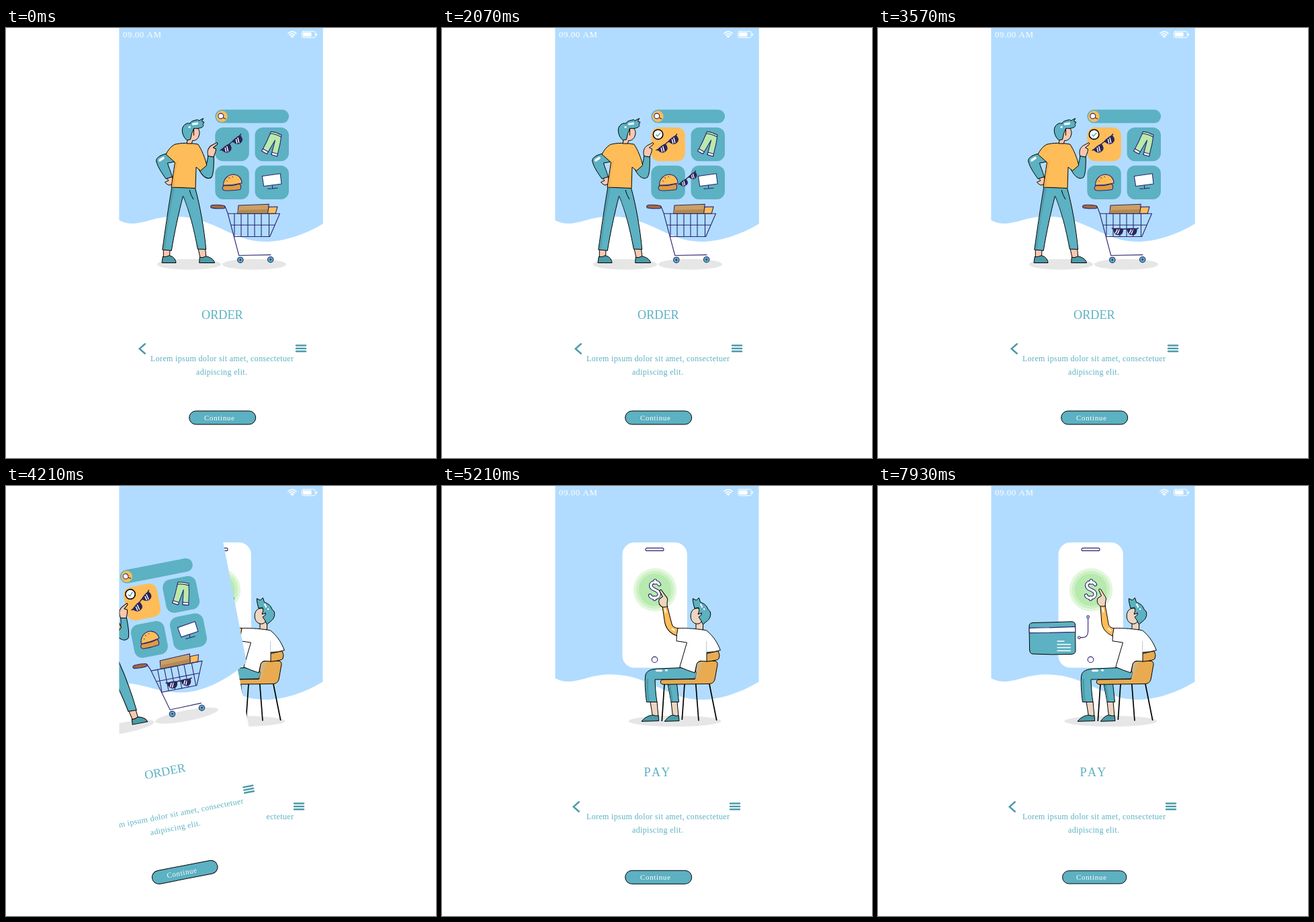
An HTML page that plays this animation: 640x640 px, repeating every 8 s.

```html
<!DOCTYPE html>
<html lang="en">
<head>
<meta charset="utf-8">
<title>Order and pay</title>
<style>
  html, body { margin: 0; width: 100%; height: 100%; overflow: hidden; background: #fff; }
  svg { display: block; width: 100%; height: 100%; }
  text { font-family: "Liberation Serif", "Times New Roman", serif; font-kerning: none; }
  .teal { fill: #5cb1c2; }
  .deep { fill: #4c9ba9; }
  .orange { fill: #ffbd59; }
  .white { fill: #fff; }
  .ink { stroke: #000; stroke-width: 1; stroke-linejoin: round; }
  .navy { stroke: #2b2670; stroke-width: 1.1; stroke-linejoin: round; stroke-linecap: round; }
  .line { fill: none; }
  .shadow { fill: #e6e6e6; }
  .pink { fill: #fbc7b0; }
  .tan { fill: #ecd5c1; }
  .chair { fill: #e8ab52; }
  .copy { font-size: 12px; letter-spacing: .35px; }
</style>
</head>
<body>
<svg viewBox="0 0 640 640">
  <defs>
    <clipPath id="screen"><rect x="168.5" width="303" height="640"/></clipPath>
    <path id="wave" fill="#b1dcff" d="M168 0H472V291C445 308 412 318 386 318C335 318 310 280.5 250 280.5C222 280.5 207 291 188 291C180 291 174 289 168 286Z"/>
    <g id="status">
      <text class="white" x="174" y="14" font-size="13" letter-spacing=".5">09.00 AM</text>
      <g fill="none" stroke="#fff" stroke-width="1.5" stroke-linecap="round">
        <path d="M419.8 8Q426 2.4 432.2 8M422 10.2Q426 6.7 430 10.2M424 12.2Q426 10.6 428 12.2"/>
        <circle cx="426" cy="13.2" r=".5"/>
        <rect x="440.4" y="5" width="20" height="9.4" rx="2.5" stroke-width="1"/>
        <path d="M462.2 8.5V11"/>
      </g>
      <rect class="white" x="442" y="6.6" width="12.5" height="6.2" rx="1"/>
    </g>
    <g id="nav" fill="none" stroke="#4c9ba9" stroke-width="2.5" stroke-linecap="round">
      <path d="M206.8 470.3L198.8 477.4L206.8 484.5M432 472.6H446M432 476.9H446M432 481.2H446"/>
    </g>
    <g id="copy" class="teal copy">
      <text x="215" y="496">Lorem ipsum dolor sit amet, consectetuer</text>
      <text x="283" y="516.3">adipiscing elit.</text>
    </g>
    <rect id="pill" class="teal ink" x="-49.5" y="-10" width="99" height="20" rx="10"/>
    <text id="label" class="white" x="295" y="583.7" font-size="11" letter-spacing=".65">Continue</text>
    <rect id="tile" width="50.5" height="50.3" rx="12"/>
    <g id="lens">
      <path fill="#2b2558" d="M-8.5 -4.6Q0 -6.2 7.5 -4.4Q8 4.8 1.5 5.4Q-6 5.6 -7.2 -2Z"/>
      <path d="M-4 2.6L-1.2 -3.4M-1.2 3.8L2.2 -3.6" stroke="#fff" stroke-width="1.5"/>
    </g>
    <g id="glasses">
      <path class="line" stroke="#2b2558" stroke-width="1.5" d="M-20 -5L-16 -4M20 -5L16 -4M-4 -3Q0 -5 4 -3"/>
      <use href="#lens" x="-10.3"/>
      <use href="#lens" x="10.3"/>
    </g>
  </defs>

  <g clip-path="url(#screen)">
    <g id="pay">
      <use href="#wave"/>
      <use href="#status"/>
      <ellipse class="shadow" cx="346.5" cy="350" rx="69" ry="8"/>
      <rect class="white" x="268.5" y="84" width="96.3" height="186.5" rx="18"/>
      <rect class="navy line" x="303" y="92.4" width="27" height="4" rx="2" stroke-width="1.3"/>
      <circle class="navy line" cx="316.5" cy="258.4" r="4.3" stroke-width="1.3"/>
      <circle cx="317" cy="154.5" r="32.3" fill="#e3f7dc"/>
      <circle cx="317" cy="154.5" r="28.2" fill="#cdf0c4"/>
      <circle cx="317" cy="154.5" r="24" fill="#b7eaae"/>
      <g id="dollar" fill="none" stroke-linecap="round">
        <path id="sign" d="M323.3 146.5C320.5 141.5 311 142 310.8 148C310.6 155.5 323.4 153.5 323.3 161C323 168 311.5 168 309.7 163M317.2 141V144M316.4 166V168.5"/>
        <use href="#sign" stroke="#2b2670" stroke-width="5.6"/>
        <use href="#sign" stroke="#fff" stroke-width="3.4"/>
      </g>

      <g id="wire" class="navy line" stroke-width="1.3">
        <circle cx="312.6" cy="194.9" r="1.8"/>
        <path id="wirePath" pathLength="100" stroke-linecap="butt" d="M312.6 197V216Q312.6 225.6 304 225.6H301.2"/>
      </g>
      <circle id="wireEnd" class="navy white" r="1.8"/>
      <g id="card">
        <path class="teal ink" d="M230 203.5Q260 203 288 201.8Q293.5 202 293.6 207L294 245Q294 250 288 250.4Q258 251.5 231 250Q226 250 225.6 244L225 209Q225 204 230 203.5Z"/>
        <path class="white navy" d="M225.1 211.4Q260 211 293.7 209.4L293.8 217.4Q260 218.5 225.2 218.6Z"/>
        <path stroke="#fff" stroke-width="1.4" d="M266.5 231H277.5M266.5 235.7H287M266.5 240.5H287M266.5 245.2H287"/>
      </g>

      <g id="payArm">
        <path class="orange ink" d="M352 212Q344 211 343 205L338 177L331 178L332.5 199C333 211 338 219 351 224Z"/>
        <path class="tan ink" d="M331.3 179C326 176 325.5 171 327 167L332.5 163.5L328.7 155Q329 152 331.5 153.7L336.5 162Q341 167 338.6 172L338 179Z"/>
        <path class="line" stroke="#fff" stroke-width="2" stroke-linecap="round" d="M334.5 182L335.4 187M343 212.5L346 215"/>
      </g>

      <path class="tan ink" d="M310 321L313.5 343H322L320 321ZM341 321L343.5 343H352L350 321Z"/>
      <path class="deep ink" d="M297 350.3C301 345 308 341 314 341Q319 343 322 341.5L322.7 349.6ZM331.3 350.3C335 345 340 341 344 341Q349 343 352 341.5L353 349.6Z"/>
      <path class="teal ink" d="M336 294L349.5 294L352.5 321.5L341 321.5Z"/>
      <path class="deep" d="M337 296H340L344 321H341Z"/>
      <path class="line" stroke="#000" stroke-width="1.7" d="M331 295L327.3 350M361 295L357.3 348M377.8 295L382 349.5M398 295L408.8 349"/>
      <path class="chair ink" d="M379 264Q381 260.5 388 260.5H406Q410.5 261 410 266L406 288Q404 294.5 397 294.5L330 295.3Q325.3 295 325.3 291.5T330 288L376 287.5Z"/>
      <path class="teal ink" d="M304.5 321.5C302.5 306 301.4 291 303 281C305.5 273 315 272 325 272L356 270.5L379 277L376.5 287L317 288C317.5 300 318 310 320 321.5Z"/>
      <path class="deep" d="M304.5 287Q303.5 300 306 320.5H309Q306 300 307.5 287Z"/>
      <path class="line" stroke="#fff" stroke-width="3" stroke-linecap="round" d="M319.5 274.8H326.5M333.5 274.3H334.5"/>
      <path fill="#bcbfae" d="M379 264L388 260.5L379.5 286H376.5Z" opacity=".55"/>
      <path class="chair ink" d="M393.5 249.5L411 245.5Q414.5 252 412 257Q410 260 393.5 261.3Z"/>
      <path class="tan ink" d="M378 203V214H388.5V202Z"/>
      <path class="tan ink" d="M382 182C374 181 369.5 187 370.2 195C371 202 376 206 382 205C389 203 389 193 388 188Z"/>
      <path class="white ink" d="M351 211.8C364 211 384 213 393.5 215C404 223 411 235 414.3 244.5Q405 247.5 394 247.5V261L384 260.5Q380 262 379 265L376.3 278Q364 274 353.8 269.5L364.5 233L349 230.7Q349 220 351 211.8Z"/>
      <path class="line" stroke="#b8c4d2" d="M393.7 231V247"/>
      <path class="teal ink" d="M376 182C374.5 177 373.3 172 373.3 167.5L378.4 170L382.5 166.5L384.5 173C391 175 394.5 179 395.7 183L399.2 187C401 193 398 198 395.5 200L388.5 206Q386.8 203 385.5 200L382 195Q387 193 386.5 189L381 191Q384 185 382 181Z"/>
      <path class="line" stroke="#fff" stroke-width="2.2" stroke-linecap="round" d="M385 176L387 180M390 183L390.3 183.5"/>

      <text class="teal" x="300.5" y="431.5" font-size="18" letter-spacing="1.4">PAY</text>
      <use href="#nav" x="-3"/>
      <use href="#copy"/>
      <g transform="translate(322.2 582.3)"><use id="payPill" href="#pill"/></g>
      <use href="#label" y="2.1"/>
    </g>

    <g id="order">
      <rect class="white" x="168" width="289" height="640"/>
      <use href="#wave"/>
      <use href="#status"/>
      <ellipse class="shadow" cx="272.5" cy="351.7" rx="47.7" ry="8"/>
      <ellipse class="shadow" cx="369.5" cy="351.7" rx="47.7" ry="8"/>

      <rect class="teal" x="311.3" y="121.6" width="109.8" height="20" rx="10"/>
      <circle class="orange" cx="321.3" cy="131.6" r="8.4"/>
      <path class="navy" stroke-width="2" d="M322.5 133.2L326.8 135.3"/>
      <circle class="white navy" cx="319.8" cy="131" r="3.9"/>
      <use id="pick" href="#tile" x="311.3" y="148"/>
      <g class="teal">
        <use href="#tile" x="370.5" y="148"/>
        <use href="#tile" x="311.3" y="204.7"/>
        <use href="#tile" x="370.5" y="204.7"/>
      </g>
      <use href="#glasses" transform="translate(337.3 173.7) rotate(-38)"/>
      <g id="check">
        <circle class="white" r="7.2" stroke="#000" stroke-width="1.6"/>
        <path class="line" stroke="#4c9ba9" stroke-width="1.3" d="M-3.2 .2L-.8 2.7L3.6 -2.5"/>
      </g>

      <path class="navy" fill="#b9eaab" d="M394.5 154.3Q402 155 410 159.2L408 172L403.5 190.8L395 188.5L400.5 167L388.5 187.3L380.8 183Q388.5 169 394.5 154.3Z"/>
      <path class="white navy" d="M382.4 179.8L380.5 183L388.3 187.5L390.2 184.2ZM395.9 185L395 188.5L403.5 191L404.4 187.5Z"/>
      <path class="navy line" stroke-width=".7" d="M393.5 157.3Q402 158 409.5 162.3"/>

      <path class="orange navy" d="M323.5 234C323.5 224 331 218 339 218C347 218.5 351 225 351 231Q338 234 323.5 234Z"/>
      <path class="navy" fill="#e09a42" d="M324 234.5Q337 235.5 348 232Q351 236 348.5 240.5Q337 242.5 325 241.7Q319.5 239 324 234.5Z"/>
      <path class="navy line" stroke-width=".9" d="M332 223L332.5 223.5M337 221.5H337.5M329 227.5L329.3 228"/>

      <path class="white navy" d="M381.3 220.5L408.3 216.7L410 232L383.7 235.5Z"/>
      <path class="navy line" d="M396.5 234.5V239M390 239.4L404 238.2"/>

      <path class="navy" fill="#cba063" d="M346 264L391.3 262.3L389.5 276.3H344.7Z"/>
      <path fill="#b48a52" d="M345.2 271L390 269.8L389.5 275.8H345Z"/>
      <path class="orange navy" d="M391 266.4L404 266L401.2 276.3H389.5Z"/>
      <use id="dropped" href="#glasses"/>
      <g class="navy line">
        <path d="M326 265.5L330 275.5L346.7 338.5L394 337.6M330.3 276.3H407.5L392.7 310.5H339.7M335 293.3H400"/>
        <path d="M340 276.3V310M350 276.3V310M360 276.3V310M370 276.3V310M380 276.3V310M391.5 276.3V310"/>
      </g>
      <path class="navy" fill="#a5673f" d="M307 263.5Q317 262.8 325 264.5Q327.5 267.5 324 268.6Q313 269.3 305.5 267.6Q303 265 307 263.5Z"/>
      <g class="teal navy">
        <circle cx="348.8" cy="345.2" r="4.2"/><circle cx="393.7" cy="344.7" r="4.2"/>
        <circle cx="348.8" cy="345.2" r=".8"/><circle cx="393.7" cy="344.7" r=".8"/>
      </g>

      <g id="orderArm">
        <path class="teal ink" d="M287 210L298 203C300 199 300 194 301 189.5L309.3 191.5C309.5 205 309 217 306 222C300 227 292 221 287 210Z"/>
        <path class="pink ink" d="M300.7 190.5C298.7 183 301 178 305.5 175L313.8 170.6Q315.7 171.8 314 173.6L308.5 178L312.5 180C312.5 185 310.3 188 309 192Z"/>
      </g>
      <path class="pink ink" d="M238.5 222.5L247 221.5Q250 227 248.5 231.5L243 234Q239 233 236.5 229.5L242 227Z"/>
      <path class="teal ink" d="M239 187C230 189 223 193 223.7 198C226 208 233 217 238 224.5L247.3 221.5C245 213 242 207 240.5 201L251 199Z"/>
      <path class="line" stroke="#fff" stroke-width="3.6" stroke-linecap="round" d="M228.8 197L234 193.4"/>
      <path class="pink ink" d="M234.3 329V342H243.5L244 330ZM286 328L289 342H298L296.5 328Z"/>
      <path class="deep ink" d="M232 349.5L233.3 340.3Q238 341.5 243 338.7C249 340 252.5 344 253 349.5ZM287.7 349.5L288.2 341.5Q293 342.5 297.5 339.7C304 341 309.5 344.5 310.5 349.5Z"/>
      <path class="teal ink" d="M247 236L281.5 238C289 265 295 300 297.7 329.5L285.3 329C280 300 273 272 263.5 250C257 275 250.5 305 246.3 331.3L232.8 330C237 300 242 265 247 236Z"/>
      <path class="deep" d="M248 238L251 239Q241 285 237 330L234 329.5Q239 285 248 238ZM263.5 250L266 251Q278 290 287.5 328.5H286Q278 285 263.5 250Z" opacity=".7"/>
      <path class="line ink" d="M273 241Q275 249 279 255"/>
      <path class="orange ink" d="M250.5 173.5C260 170.5 274 171 285.7 173C291 180 297 195 298.7 204.5L289.5 212.5L283 207L282 238.5L246 237L251.5 200L238 188Q243 178 250.5 173.5Z"/>
      <path fill="#e8a94c" d="M252 201L257 196Q250 215 251 237H246.8Z" opacity=".6"/>
      <path class="pink ink" d="M276 149C286 146 289.7 152 287.3 160C285.5 166 281 168 277.5 167.5L276.5 172H269L271 162Z"/>
      <path class="teal ink" d="M269.5 167C262.5 162 261.3 152 263 148C266 142 271 141 274 142.3C275 138 281 137.5 285.5 136.5L287 138L293.7 134.5L291.5 139L295 140.2L293 143.5C296.5 147 288 150.5 279.5 149.5Q276 157 274.5 166Z"/>
      <path class="line ink" d="M279.5 150V160"/>
      <path class="line" stroke="#fff" stroke-width="3.2" stroke-linecap="round" d="M278.5 143L284.5 142.2M273 147.5H273.2"/>

      <text class="teal" x="291" y="433" font-size="18.2">ORDER</text>
      <use href="#nav"/>
      <use href="#copy"/>
      <g transform="translate(322.2 580)"><use id="orderPill" href="#pill"/></g>
      <use href="#label"/>
    </g>
  </g>
</svg>
<script>
  const LOOP = 8000;
  const el = id => document.getElementById(id);
  const lin = (t, a, b) => Math.min(1, Math.max(0, (t - a) / (b - a)));
  const ease = (t, a, b) => { const k = lin(t, a, b); return k * k * (3 - 2 * k); };
  const mix = (a, b, k) => a + (b - a) * k;
  const move = (id, value) => el(id).setAttribute('transform', value);
  const show = (id, on) => { el(id).style.display = on ? '' : 'none'; };
  const press = (t, start) => 1 - .075 * Math.sin(Math.PI * lin(t, start, start + 430));

  const teal = [92, 177, 194], orange = [255, 189, 89];

  function drawOrder(t) {
    const reach = ease(t, 0, 860) - ease(t, 860, 1570);
    move('orderArm', `rotate(${22 * reach} 290 208)`);

    const picked = ease(t, 870, 1250);
    el('pick').setAttribute('fill', `rgb(${teal.map((c, i) => mix(c, orange[i], picked))})`);
    move('check', `translate(321.6 158.4) scale(${picked})`);

    const grow = ease(t, 1640, 2040), settle = ease(t, 2070, 2500), fall = lin(t, 2500, 2860);
    const y = mix(mix(225.7, 257, settle), 303, fall);
    const size = grow * mix(.84, 1, settle);
    move('dropped', `translate(${mix(367.2, 367.8, settle)} ${y}) rotate(${-38 * (1 - settle)}) scale(${size})`);
    move('orderPill', `scale(${press(t, 3140)})`);

    // Slides left while tumbling around the centre of the stage.
    const out = Math.pow(Math.max(0, t - 4000) / 210, 1.25);
    const leaving = t >= 4070 ? out : 0;
    move('order', `translate(${-105 * leaving} 0) rotate(${-10.95 * leaving} 320 320)`);
    show('order', t < 4710);
  }

  function drawPay(t) {
    const reach = ease(t, 4860, 5710) - ease(t, 5710, 6290);
    move('payArm', `rotate(${-12 * reach} 346 217)`);
    const pulse = 1 - .05 * Math.sin(Math.PI * lin(t, 5400, 6100));
    move('dollar', `translate(317 154.5) scale(${pulse}) translate(-317 -154.5)`);

    const drawn = 100 * lin(t, 5760, 6570);
    el('wirePath').setAttribute('stroke-dasharray', `${drawn} 200`);
    show('wire', t >= 5780);
    move('wireEnd', `translate(299.3 225.6) scale(${lin(t, 6600, 6790)})`);

    move('card', `translate(259.5 226.5) scale(${ease(t, 6860, 7500)}) translate(-259.5 -226.5)`);
    move('payPill', `scale(${press(t, 7860)})`);
  }

  const start = performance.now();
  function frame(now) {
    const t = Math.max(0, now - start) % LOOP;
    drawOrder(t);
    drawPay(t);
    requestAnimationFrame(frame);
  }
  frame(start);
</script>
</body>
</html>
```
